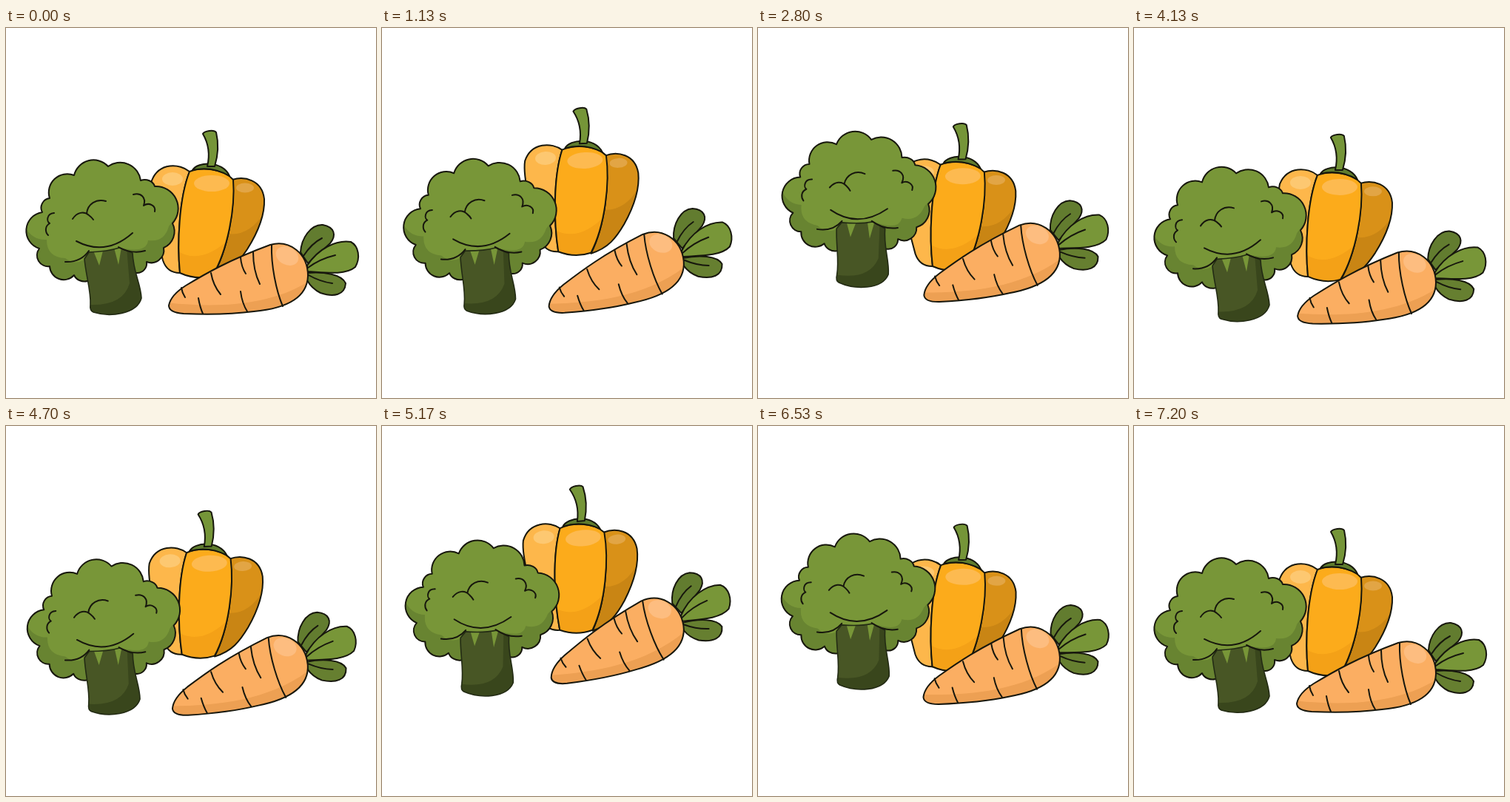
These frames come from a looping animation (500 px wide and 500 px high, 7310 ms). An HTML page:

```html
<!DOCTYPE html>
<html lang="en">
<head>
<meta charset="utf-8">
<title>Bobbing vegetables</title>
<style>
  html, body { margin: 0; width: 100%; height: 100%; overflow: hidden; background: #fff; }
  svg { display: block; width: 100vw; height: 100vh; }
  .ink { fill: none; stroke: #17170d; stroke-width: 2; stroke-linecap: round; stroke-linejoin: round; }
  .edge { stroke: #17170d; stroke-width: 2; stroke-linejoin: round; }
  .soft { fill: none; stroke: #232b14; stroke-width: 1.6; }
</style>
</head>
<body>
<svg viewBox="0 0 500 500">
  <defs>
    <path id="panel" d="M248 194C263 188 293 189 307 205C310 242 300 300 279 335Q257 341 235 331C231 290 234 230 248 194Z"/>
    <path id="side" d="M306 205C322 200 346 205 349 231C350 255 338 280 326 299C314 317 303 330 279 336C300 300 310 242 306 205Z"/>
    <path id="root" d="M220 375C222 364 232 355 243 348C268 333 300 314 357 293C383 286 408 304 408 335C407 365 378 379 335 383C305 387 265 387 240 386C226 385 220 381 220 375Z"/>
    <path id="head" d="M110 342A15 13 0 0 1 92 334A19 19 0 0 1 59 322A15 15 0 0 1 45 298A25.2 25.2 0 0 1 49 249A13 13 0 0 1 59 230A25 25 0 0 1 92 199A27 27 0 0 1 138 187A28 28 0 0 1 182 206A14 12 0 0 1 201 214A30 30 0 0 1 225 264A24 24 0 0 1 213 297A17 17 0 0 1 190 316A13 13 0 0 1 176 331Z"/>
    <path id="stalk" d="M106 312L112 303Q138 302 153 297L171 304C172 330 182 345 183 365C177 387 140 391 118 384Q113 382 114 374C115 355 108 335 106 312Z"/>
    <clipPath id="inPanel"><use href="#panel"/></clipPath>
    <clipPath id="inSide"><use href="#side"/></clipPath>
    <clipPath id="inRoot"><use href="#root"/></clipPath>
    <clipPath id="inHead"><use href="#head"/></clipPath>
    <clipPath id="inStalk"><use href="#stalk"/></clipPath>
  </defs>

  <g id="pepper">
    <path class="edge" fill="#fdb74b" d="M248 194C235 183 207 181 197 206C192 229 204 285 212 314C216 326 224 331 235 331C231 290 234 230 248 194Z"/>
    <ellipse cx="225" cy="204" rx="14" ry="9" fill="#fdc871"/>
    <use href="#side" fill="#d99118"/>
    <path clip-path="url(#inSide)" fill="#c98514" d="M300 278Q330 282 352 245V340H270Z"/>
    <ellipse cx="323" cy="216" rx="12" ry="6.5" fill="#e2a545"/>
    <use href="#side" class="ink"/>
    <use href="#panel" fill="#fcab1b"/>
    <path clip-path="url(#inPanel)" fill="#f4a117" d="M230 300Q262 322 302 285V345H225Z"/>
    <ellipse cx="278" cy="210" rx="24" ry="11" fill="#fdba50"/>
    <use href="#panel" class="ink"/>
    <path class="edge" fill="#5f7c2e" d="M252 192C259 180 293 179 302 200Q278 186 252 192Z"/>
    <path class="edge" fill="#759538" d="M266 143C268 139 281 137 284 141C288 158 286 174 282 187L272 187C276 170 273 155 266 143Z"/>
  </g>

  <g id="broccoli">
    <use href="#head" fill="#789638"/>
    <path clip-path="url(#inHead)" fill="#688431" d="M20 255Q30 288 55 286Q55 310 80 311Q98 325 118 303V350H20ZM155 297Q190 305 192 287Q214 290 220 268L240 240V340H155Z"/>
    <use href="#head" class="ink"/>
    <use href="#stalk" fill="#485625"/>
    <path clip-path="url(#inStalk)" fill="#39461c" d="M112 374Q158 376 167 345L163 297H190V392H110Z"/>
    <path fill="#789638" d="M118 301L126 321L131 301ZM146 297L152 320L156 296Z"/>
    <use href="#stalk" class="soft"/>
    <path class="ink" d="M95 288Q135 309 171 277M152 296Q170 306 188 301M80 316Q101 317 112 301M90 258C96 249 105 247 112 253Q116 256 118 259M109 251C110 238 122 230 135 234M172 225C182 222 190 229 186 240C193 235 203 240 201 248M65 250C54 251 55 262 59 264C52 268 53 276 57 280"/>
  </g>

  <g id="carrot">
    <path class="edge" fill="#627c2f" d="M398 303C399 284 412 265 428 266C444 269 447 280 438 291L408 318Z"/>
    <path class="edge" fill="#667f30" d="M407 331C430 329 454 333 459 345C458 361 443 364 425 358Q413 352 407 341Z"/>
    <path class="edge" fill="#789638" d="M407 321C422 298 446 286 466 289C477 295 479 311 472 323C458 335 428 330 407 329Z"/>
    <path class="ink" d="M402 308Q413 291 427 284M408 324Q424 312 445 307M409 334Q425 343 441 345"/>
    <use href="#root" fill="#fbae62"/>
    <path clip-path="url(#inRoot)" fill="#eda053" d="M215 371C275 377 350 379 410 342V392H215Z"/>
    <ellipse cx="380" cy="308" rx="16" ry="12" transform="rotate(28 380 308)" fill="#fdbd80"/>
    <use href="#root" class="ink"/>
    <path class="ink" d="M359 293C358 320 365 355 374 376M317 310Q318 323 324 332M334 303Q334 328 343 346M317 356Q319 372 326 383M277 331Q280 348 290 360M260 365Q262 377 266 386M237 351Q238 358 242 364"/>
  </g>
</svg>
<script>
const LOOP = 7310, SECOND = 3645, END = 3567;

// Each key is [time, value]; the value eases along a half cosine between keys.
const parts = [
  { id: 'pepper', pivot: '258 275',
    y: [[0, 0], [533, 5], [1667, -59.5], [3200, 0]],
    turn: [[400, 0], [1720, -5.6], [3200, 0]] },
  { id: 'broccoli', pivot: '130 312',
    y: [[0, 0], [650, 11], [2350, -54.5], [END, 0]],
    turn: [[500, 0], [2350, 10], [END, 0]] },
  { id: 'carrot', pivot: '366 335',
    y: [[0, 0], [650, 12], [2000, -85], [3300, 0]],
    turn: [[0, 0], [2000, -11], [END, 0]] }
];
for (const p of parts) p.node = document.getElementById(p.id);

function ease(keys, t) {
  const i = keys.findIndex(k => k[0] > t);
  if (i < 0) return keys.at(-1)[1];
  if (i === 0) return keys[0][1];
  const [t0, a] = keys[i - 1], [t1, b] = keys[i];
  return a + (b - a) * (1 - Math.cos(Math.PI * (t - t0) / (t1 - t0))) / 2;
}

const start = performance.now();
function draw() {
  const t = (performance.now() - start) % LOOP;
  const beat = t < SECOND ? t : t - SECOND;
  for (const p of parts)
    p.node.setAttribute('transform',
      `translate(0 ${ease(p.y, beat)}) rotate(${ease(p.turn, beat)} ${p.pivot})`);
  requestAnimationFrame(draw);
}
draw();
</script>
</body>
</html>
```
